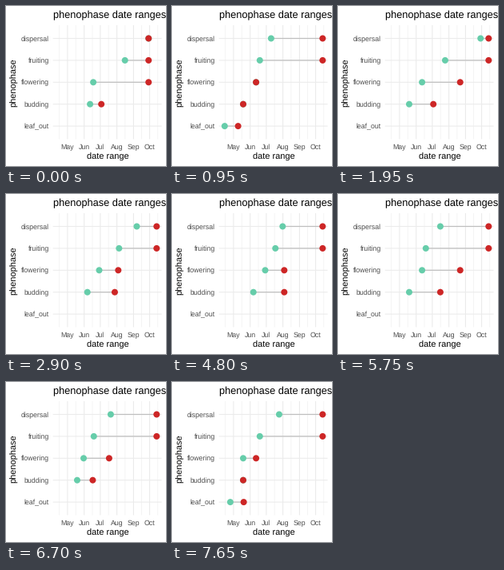
These frames come from a looping animation (200x200 px, 8 s). A matplotlib script:

```python
import matplotlib.pyplot as plt
import numpy as np
from matplotlib.animation import FuncAnimation
from matplotlib.patches import Circle

plt.rcParams["font.family"] = "Liberation Sans"
plt.rcParams["text.hinting"] = "none"

INTERVAL = 50
LOOP = 8000
SEASON_MS = 955
PX = 0.72  # points per pixel at 100 dpi
GREEN, RED, GRID, GREY = "#66cdaa", "#cd2626", "#ebebeb", "#4d4d4d"
LEFT, RIGHT, TOP, BOTTOM = 58.7, 194.5, 24, 166.4

PHASES = ["dispersal", "fruiting", "flowering", "budding", "leaf_out"]
MONTHS = ["May", "Jun", "Jul", "Aug", "Sep", "Oct"]

# Key seasons: budding from/to, flowering from/to, fruiting and dispersal onset.
KEY_SEASONS = {
    0: (163, 184, 169, 272, 228, 272),
    1: (139, 139, 163, 163, 170, 191),
    2: (139, 184, 163, 234, 206, 272),
    4: (177, 234, 197, 197, 228, 228),
    6: (139, 197, 163, 234, 170, 197),
    8: (139, 139, 139, 163, 170, 206),
}


def day_x(day):
    return 76.9 + (day - 121) * 0.671


def row_y(row):
    return 40.5 + row * 27.4


def season_ranges(season):
    """First and last day of each phase, from the top row down."""
    bud, bud_end, flower, flower_end, fruit, scatter = (
        np.interp(season, list(KEY_SEASONS), column)
        for column in zip(*KEY_SEASONS.values()))
    close = min(287, 272 + 15 * season)
    # Fruit that disperses at once is gone within a week.
    fruit_end = close if scatter > fruit else fruit + 6
    ranges = [(scatter, close), (fruit, fruit_end),
              (flower, flower_end), (bud, bud_end)]
    # Leaves are only recorded when budding is over in a day.
    if bud == bud_end:
        leaf = 103 + 1.5 * season
        ranges.append((leaf, leaf + 25))
    return ranges


fig = plt.figure(figsize=(2, 2), dpi=100, facecolor="white")
ax = fig.add_axes([0, 0, 1, 1])
ax.set(xlim=(0, 200), ylim=(200, 0))
ax.axis("off")


def line(xs, ys, color, width, z=1):
    return ax.plot(xs, ys, color=color, lw=width * PX, snap=False,
                   solid_capstyle="butt", zorder=z)[0]


def dot(color, z):
    return ax.add_patch(Circle((0, 0), 4, fc=color, lw=0, zorder=z))


def label(x, y, text, size, color="black", **kw):
    ax.text(x, y, text, fontsize=size * PX, color=color, va="baseline", **kw)


month_starts = np.datetime64("2021-05") + np.arange(len(MONTHS))
year_days = month_starts.astype("datetime64[D]") - np.datetime64("2020-12-31")
majors = day_x(year_days.astype(int))
half = np.diff(majors).mean() / 2
for x in [majors[0] - half, *(majors + half)]:
    line([x, x], [TOP, BOTTOM], GRID, 0.53)
for row, phase in enumerate(PHASES):
    y = row_y(row)
    line([LEFT, RIGHT], [y, y], GRID, 1.07)
    label(54, y + 3.3, phase, 8.8, GREY, ha="right")
for x, month in zip(majors, MONTHS):
    line([x, x], [TOP, BOTTOM], GRID, 1.07)
    label(x, 179, month, 8.8, GREY, ha="center")

label(58.7, 15, "phenophase date ranges", 12.75)
label(127, 192, "date range", 11, ha="center")
label(13, 95.3, "phenophase", 11, rotation=90, ha="center",
      rotation_mode="anchor")

marks = [(line([], [], "#bebebe", 1.2, 2), dot(GREEN, 3), dot(RED, 4))
         for _ in PHASES]


def update(frame):
    ranges = season_ranges((frame * INTERVAL + 7) // SEASON_MS)
    for row, (bar, start, end) in enumerate(marks):
        seen = row < len(ranges)
        for mark in (bar, start, end):
            mark.set_visible(seen)
        if seen:
            y = row_y(row)
            first, last = map(day_x, ranges[row])
            bar.set_data([first, last], [y, y])
            start.center = first, y
            end.center = last, y
    return [mark for group in marks for mark in group]


anim = FuncAnimation(fig, update, frames=LOOP // INTERVAL, interval=INTERVAL,
                     repeat=True, repeat_delay=0)
plt.show()
```
